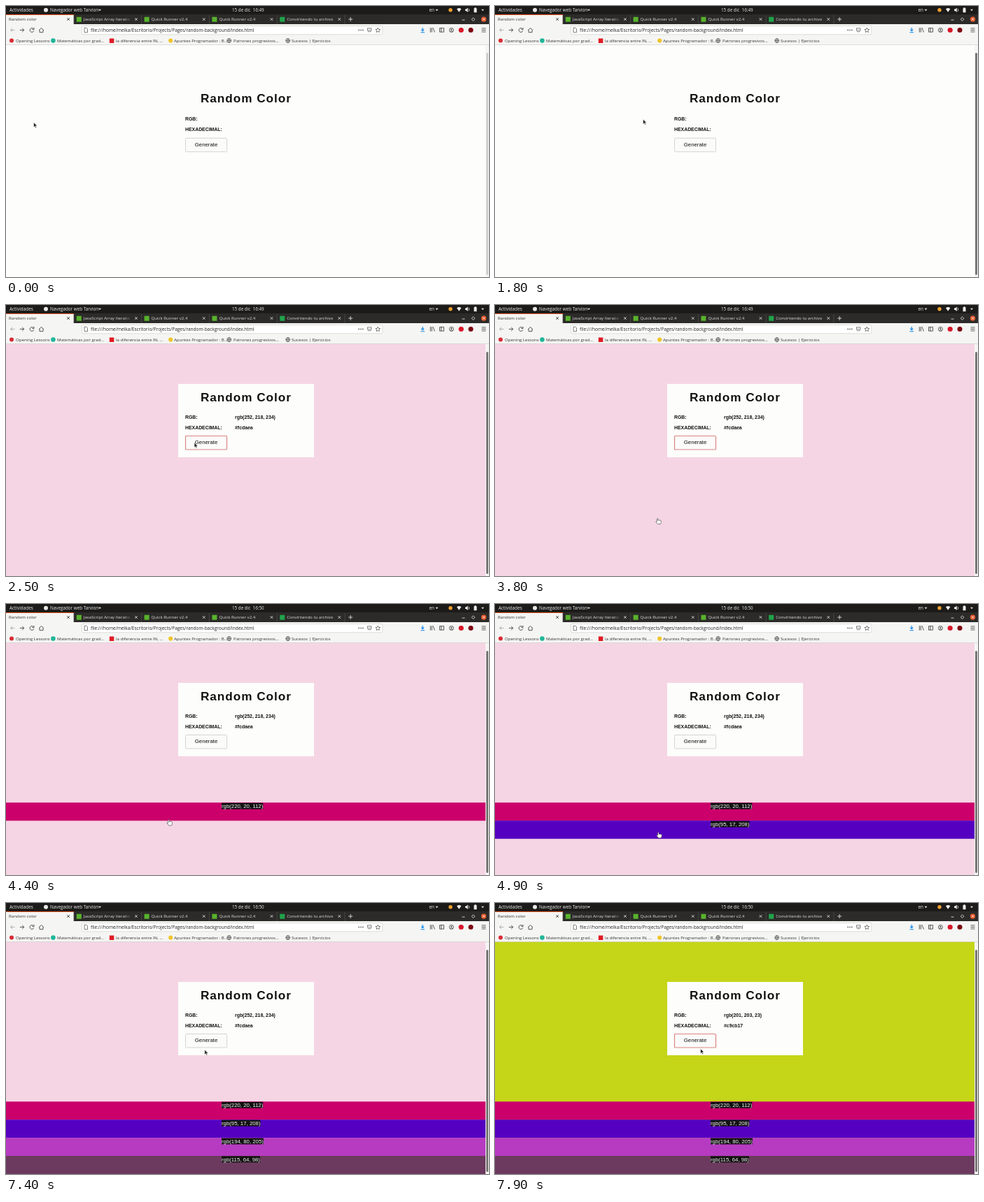
Write an HTML page that moves like this. It is 690x388 px and loops after 8 s.

```html
<!DOCTYPE html>
<html lang="es">
<head>
<meta charset="utf-8">
<title>Random color</title>
<style>
html, body { margin: 0; width: 100%; height: 100%; overflow: hidden; background: #fdfefb; }
svg { display: block; width: 100%; height: 100%; }
text { white-space: pre; }
.ui { font: 6.1px "Open Sans", "Noto Sans", sans-serif; }
.page { font: bold 6.9px "Liberation Sans", Arial, sans-serif; fill: #111; }
.page .plain { font-weight: normal; font-size: 7.8px; }
.line { fill: none; stroke: #444; stroke-width: .9; }
</style>
</head>
<body>
<svg id="stage" viewBox="0 0 690 388" preserveAspectRatio="none">
  <defs>
    <linearGradient id="fade"><stop offset="0" stop-color="#2c2b29" stop-opacity="0"/><stop offset="1" stop-color="#2c2b29"/></linearGradient>
  </defs>

  <rect id="back" y="55" width="685" height="333"/>
  <g id="bars" class="page"></g>
  <rect x="685" y="55" width="5" height="333" fill="#f5f5f3"/>
  <rect id="thumb" x="686" y="67" width="3" height="318" rx="1.5"/>

  <g class="page">
    <rect x="246" y="113" width="194" height="105" fill="#fdfefb"/>
    <text x="278" y="138.3" style="font-size:17.15px;letter-spacing:.98px">Random Color</text>
    <text id="rgbLabel" x="256">RGB:</text>
    <text id="hexLabel" x="256">HEXADECIMAL:</text>
    <text id="rgb" x="327" y="162.8"></text>
    <text id="hex" x="327" y="177.6"></text>
    <g id="button">
      <rect id="frame" x="256.5" y=".5" width="59" height="19.5" rx="1" fill="#fbfbfa"/>
      <text class="plain" x="269.8" y="12.2">Generate</text>
    </g>
  </g>

  <g id="chrome" class="ui">
    <rect width="690" height="12" fill="#1c1b1a"/>
    <rect y="12" width="690" height="14" fill="#2c2b29"/>
    <rect y="12" width="97" height="14" fill="#f5f5f3"/>
    <rect y="12" width="97" height="1" fill="#e95420"/>
    <rect y="26" width="690" height="29.5" fill="#f5f5f3"/>
    <path d="M0 55.5H690" stroke="#d2d1ce" stroke-width=".7"/>
    <rect x="108.3" y="28.5" width="429.5" height="12.3" rx="1.5" fill="#fff" stroke="#cfcecb" stroke-width=".7"/>

    <!-- system bar -->
    <circle cx="57" cy="5.8" r="3" fill="#e8e8e6"/>
    <path d="M132 4.7h4l-2 2.5zM613.5 4.7h4l-2 2.5zM679 4.7h4l-2 2.5z" fill="#ddd"/>
    <circle cx="635" cy="5.8" r="2.7" fill="#f0a030"/>
    <path d="M644 4.2q3.2-2.6 6.4 0L647.2 8.7z" fill="#eee"/>
    <path d="M656 4.6h1.5l2.2-2v6.4l-2.2-2H656z" fill="#eee"/>
    <path class="line" d="M661 3.8q1.5 2 0 4" style="stroke:#ddd"/>
    <path d="M668.5 3.2h1v-1h2v1h1v6h-4z" fill="#eee"/>

    <!-- window controls -->
    <path class="line" d="M651.5 20h4M667.5 16.8l2.3 2.3-2.3 2.3-2.3-2.3z" style="stroke:#ddd"/>
    <circle cx="682.5" cy="19" r="3.7" fill="#e2572b"/>
    <path class="line" d="M681 17.5l3 3m0-3l-3 3" style="stroke:#fff"/>
    <path class="line" d="M489.2 19h6M492.2 16v6" style="stroke:#ddd"/>

    <!-- navigation -->
    <path class="line" d="M12.5 34.5h-6m2.7-2.7l-2.7 2.7 2.7 2.7" style="stroke:#aaa"/>
    <path class="line" d="M19.8 34.5h6m-2.7-2.7l2.7 2.7-2.7 2.7M39.3 32.8a2.9 2.9 0 1 0 .5 2.5M40 31v2.5h-2.6M47 34.8l3.5-3.3 3.5 3.3M48 34.3v3.4h5v-3.4"/>
    <path class="line" d="M112 31.3h3l1.5 1.5v5H112zM516.5 31.8h5.4v2.5a2.7 2.7 0 0 1-5.4 0zM517.7 33.8l1.5 1.5 1.5-1.5M531.3 31.2l1 2.2 2.4.2-1.8 1.6.5 2.4-2.1-1.2-2.1 1.2.5-2.4-1.8-1.6 2.4-.2z" style="stroke-width:.7"/>
    <path d="M503.5 34.5h7" stroke="#444" stroke-width="1.4" stroke-dasharray="1.4"/>
    <path class="line" d="M595.2 31v4.7m-2-2l2 2 2-2m-4.8 4.1h5.6" style="stroke:#0a84e8;stroke-width:1.1"/>
    <path class="line" d="M606.3 31.2v6.5M608.3 31.2v6.5M610 31.2l2.4 6.5M619.5 31.7h6v5.5h-6zM621.8 31.7v5.5M679.5 32h6m-6 2.5h6m-6 2.5h6"/>
    <circle class="line" cx="636.4" cy="34.5" r="3"/>
    <circle cx="636.4" cy="33.8" r="1" fill="#444"/>
    <path class="line" d="M634.6 36.6q1.8-2 3.6 0"/>
    <circle cx="650.2" cy="34.5" r="3.6" fill="#d91528"/>
    <circle cx="664" cy="34.5" r="3.5" fill="#7d0712"/>

    <!-- bookmark icons -->
    <circle cx="8" cy="49.6" r="3" fill="#d92b35"/>
    <circle cx="67.4" cy="49.6" r="3.3" fill="#20b69a"/>
    <rect x="147.8" y="46.5" width="6.5" height="6.5" fill="#e01b24"/>
    <circle cx="235.2" cy="49.6" r="3.1" fill="#f0c52c"/>
  </g>

  <path id="arrow" d="M0 0V7.2L1.7 5.7 2.8 8.2 4 7.6 2.9 5.2H5.1z" fill="#222" stroke="#fff" stroke-width=".6"/>
  <path id="hand" d="M2 4.5V1.1q.8-1.3 1.5 0V3.2h3.2q1 .2 1 1.2V6.7L6.8 8.7H3L.4 5.5Q.3 4.4 1.2 4.5L2 5.2z" fill="#fff" stroke="#333" stroke-width=".6"/>
</svg>

<script>
const NS = "http://www.w3.org/2000/svg";
const $ = id => document.getElementById(id);
const LOOP = 8000;

function add(parent, tag, attrs, text = "") {
  const el = document.createElementNS(NS, tag);
  for (const key in attrs) el.setAttribute(key, attrs[key]);
  el.textContent = text;
  return parent.appendChild(el);
}
const set = (id, key, value) => $(id).setAttribute(key, value);
const label = (x, y, text, fill = "#333", size = 6.1) =>
  add($("chrome"), "text", { x, y, fill, style: `font-size:${size}px` }, text);

label(5, 8.2, "Actividades", "#eee", 6.4);
label(63, 8.2, "Navegador web Tarvion", "#eee", 6.3);
const clock = label(323, 8.2, "", "#eee", 6.3);
label(604.5, 8.2, "en", "#eee", 6.3);
label(121, 36.8, "file:///home/melka/Escritorio/Projects/Pages/random-background/index.html", "#222", 6.5);

const tabs = ["Random color", "JavaScript Array Iteratio", "Quick Runner v2.4", "Quick Runner v2.4", "Convirtiendo tu archivo"];
tabs.forEach((title, i) => {
  const x = i * 96.8, ink = i ? "#ddd" : "#333";
  label(i ? x + 14 : 4, 21.3, title, ink);
  if (i) add($("chrome"), "rect", { x: x + 4, y: 15.7, width: 7, height: 7, fill: i < 4 ? "#58b32c" : "#20a34a" });
  if (i == 1) add($("chrome"), "rect", { x: 168, y: 14, width: 13, height: 11, fill: "url(#fade)" });
  add($("chrome"), "path", { class: "line", d: `M${x + 87.3} 17.2l3.6 3.6m0-3.6l-3.6 3.6`, style: `stroke:${ink}` });
  add($("chrome"), "path", { d: `M${x + 96.8} 13V26`, stroke: "#555", "stroke-width": .6 });
});

[[14, "Opening Lessons"], [73, "Matemáticas por grad…"], [157, "la diferencia entre IN, …"],
 [240, "Apuntes Programador : B…"], [325, "Patrones progresivos…"], [408, "Sucesos | Ejercicios"]]
  .forEach(([x, text]) => label(x, 51.7, text));

for (const x of [318.7, 402.7])
  add($("chrome"), "path", { class: "line", style: "stroke-width:.7",
    d: `M${x - 3} 49.6a3 3 0 1 0 6 0a3 3 0 1 0-6 0h6M${x} 46.6q-3 3 0 6q3-3 0-6` });

// Each bar: appearance time, label, fill
const bars = [
  [4100, "rgb(220, 20, 112)", "#cb006b"],
  [4800, "rgb(95, 17, 208)", "#5500c1"],
  [5900, "rgb(194, 80, 205)", "#b63bc1"],
  [6700, "rgb(115, 64, 98)", "#6d3a5f"]
].map(([start, text, fill], i) => {
  const y = 284.3 + i * 25.9;
  const g = add($("bars"), "g", {});
  add(g, "rect", { y, width: 685, height: 26, fill });
  const mark = add(g, "rect", { x: 308, y: y + .5, height: 8.9, fill: "#111" });
  const name = add(g, "text", { class: "plain", x: 308, y: y + 7.5, fill: "#f4f4f4" }, text);
  mark.setAttribute("width", name.getComputedTextLength());
  return { start, g };
});

const themes = [
  { start: 0, back: "#fdfefb", rgb: "", hex: "" },
  { start: 2300, back: "#f5d5e4", rgb: "rgb(252, 218, 234)", hex: "#fcdaea" },
  { start: 7600, back: "#c5d518", rgb: "rgb(201, 203, 23)", hex: "#c9cb17" }
];

// Pointer path: time, x, y
const path = [
  [0, 39.5, 166.5], [300, 39.5, 166.5], [1800, 211.5, 162], [2200, 269, 197], [2700, 269, 197],
  [3600, 229.5, 305], [4300, 229.5, 305], [4700, 230.5, 326.3], [5300, 230.5, 326.3],
  [5800, 244.5, 367], [6800, 244.5, 367], [7500, 286, 201], [7650, 286, 201], [7900, 293.5, 208.5]
];

function pointer(t) {
  const i = path.findIndex(p => p[0] > t);
  if (i < 0) return path.at(-1).slice(1);
  const [a, b] = [path[i - 1], path[i]];
  const u = (t - a[0]) / (b[0] - a[0]), k = u * u * (3 - 2 * u);
  return [a[1] + (b[1] - a[1]) * k, a[2] + (b[2] - a[2]) * k];
}

function draw(t) {
  const theme = themes.findLast(s => t >= s.start);
  const filled = theme.start > 0;
  const focused = (t >= 2300 && t < 4100) || t >= 7600;
  set("back", "fill", theme.back);
  $("rgb").textContent = theme.rgb;
  $("hex").textContent = theme.hex;
  set("rgbLabel", "y", filled ? 162.8 : 163.6);
  set("hexLabel", "y", filled ? 177.6 : 179.4);
  set("button", "transform", `translate(0 ${filled ? 187 : 188.7})`);
  set("frame", "stroke", focused ? "#d98583" : "#cbcbca");
  set("frame", "stroke-width", focused ? 1.2 : .8);
  set("thumb", "fill", t < 100 ? "#cfcfcd" : "#777674");
  clock.textContent = `15 de dic  16:${t < 4400 ? 49 : 50}`;
  for (const { start, g } of bars) g.setAttribute("visibility", t >= start ? "visible" : "hidden");

  const [x, y] = pointer(t), onBars = y > 284;
  for (const [id, shown] of [["arrow", !onBars], ["hand", onBars]]) {
    set(id, "transform", `translate(${x} ${y})`);
    set(id, "visibility", shown ? "visible" : "hidden");
  }
}

const origin = performance.now();
function tick() {
  draw((performance.now() - origin) % LOOP);
  requestAnimationFrame(tick);
}
tick();
</script>
</body>
</html>
```
